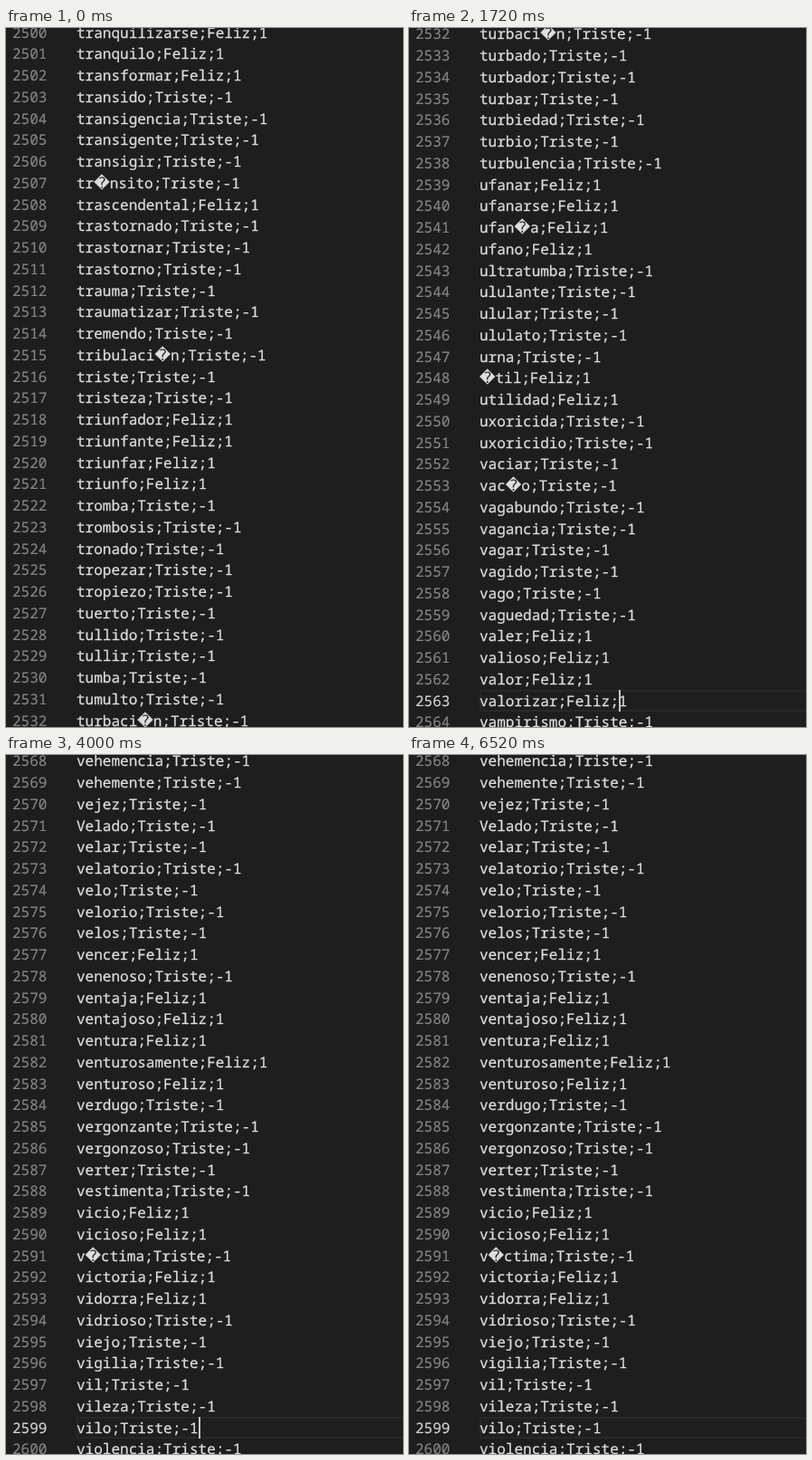
Animation of 439 by 772 pixels, one loop 6990 ms. Source, as an HTML page:

```html
<!DOCTYPE html>
<html lang="es">
<head>
<meta charset="utf-8">
<title>Word list</title>
<style>
html, body { margin: 0; width: 100%; height: 100%; overflow: hidden; background: #1e1e1e; }
svg { display: block; }
text { font: 16.035px "Noto Sans Mono", monospace; font-variant-ligatures: none; text-rendering: geometricPrecision; fill: #dedede; stroke: #dedede; stroke-width: .25; }
.num { fill: #858585; stroke: #858585; stroke-width: .15; }
.num.active { fill: #d4d4d4; stroke: #d4d4d4; }
.bad { font: 17px "DejaVu Sans", sans-serif; }
.line { fill: none; stroke: #282828; stroke-width: 2; }
.caret { fill: #c8c6c0; }
</style>
</head>
<body>
<svg id="stage" width="439" height="772"></svg>
<script>
const LOOP = 6990, PITCH = 23.75, CHAR = 9.621, LEFT = 78;

// "+" marks a happy word, "_" an undecodable letter
const early = `tranquilizarse+ tranquilo+ transformar+ transido transigencia transigente transigir
tr_nsito trascendental+ trastornado trastornar trastorno trauma traumatizar tremendo tribulaci_n
triste tristeza triunfador+ triunfante+ triunfar+ triunfo+ tromba trombosis tronado tropezar tropiezo
tuerto tullido tullir tumba tumulto turbaci_n turbado turbador turbar turbiedad turbio turbulencia
ufanar+ ufanarse+ ufan_a+ ufano+ ultratumba ululante ulular ululato urna _til+ utilidad+ uxoricida
uxoricidio vaciar vac_o vagabundo vagancia vagar vagido vago vaguedad valer+ valioso+ valor+
valorizar+ vampirismo`.split(/\s+/);
const late = `vehemencia vehemente vejez Velado velar velatorio velo velorio velos vencer+ venenoso
ventaja+ ventajoso+ ventura+ venturosamente+ venturoso+ verdugo vergonzante vergonzoso verter
vestimenta vicio+ vicioso+ v_ctima victoria+ vidorra+ vidrioso viejo vigilia vil vileza vilo
violencia`.split(/\s+/);

const pages = [
  { start: 0, first: 2500, words: early.slice(0, 33), top: -7.5, active: 27, col: 16 },
  { start: 1720, first: 2532, words: early.slice(32), top: -5.75, active: 31, col: 16 },
  { start: 4000, first: 2568, words: late, top: -5.75, active: 31, col: 14 }
];
const blinks = [340, 800, 1280, 2200, 2670, 3180, 3680, 4510, 5080, 5500, 6020, 6520];
const stage = document.getElementById("stage");

function entry(word) {
  const label = word.endsWith("+") ? word.replace("+", ";Feliz;1") : word + ";Triste;-1";
  return label.replace("_", '<tspan class="bad">&#xFFFD;</tspan>');
}

function render(page, focused, caretOn) {
  const rowTop = i => Math.round(page.top + i * PITCH);
  const y = rowTop(page.active);
  let out = focused ? `<rect class="line" x="79" y="${y + 1}" width="370" height="22"/>` : "";
  page.words.forEach((word, i) => {
    const base = rowTop(i) + 18;
    const cls = focused && i === page.active ? "num active" : "num";
    out += `<text class="${cls}" x="7" y="${base}">${page.first + i}</text>`;
    out += `<text x="${LEFT}" y="${base}">${entry(word)}</text>`;
  });
  if (caretOn) {
    out += `<rect class="caret" x="${Math.round(LEFT + page.col * CHAR)}" y="${y}" width="2" height="24"/>`;
  }
  stage.innerHTML = out;
}

let shown = "";
function tick() {
  const t = performance.now() % LOOP;
  const page = pages.findLast(p => t >= p.start);
  const caretOn = blinks.filter(b => t >= b).length % 2 === 1;
  const focused = t >= blinks[0];
  const state = [page.first, focused, caretOn].join();
  if (state !== shown) render(page, focused, caretOn);
  shown = state;
  requestAnimationFrame(tick);
}
tick();
</script>
</body>
</html>
```
